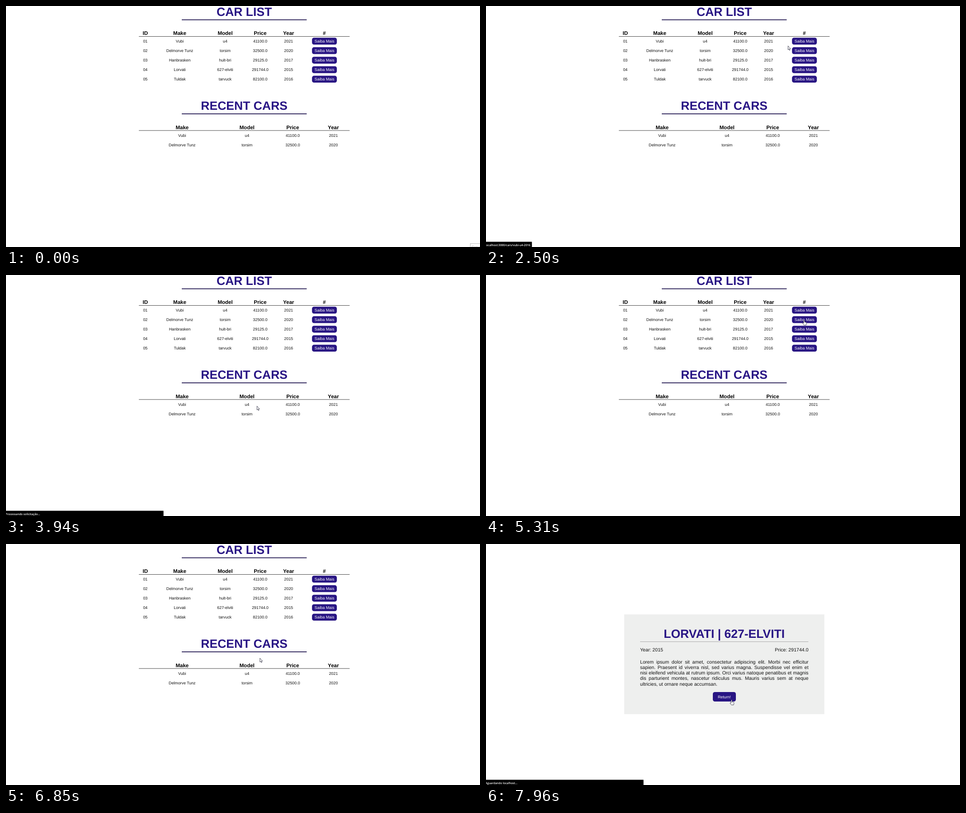
An HTML page for the animation above (8 s loop, 1049 by 534 pixels).

```html
<!DOCTYPE html>
<html lang="pt">
<head>
<meta charset="utf-8">
<style>
  html, body { margin: 0; width: 100%; height: 100%; overflow: hidden; background: #fff; }
  svg, #story, #status { position: absolute; }
  svg { left: 0; top: 0; }
  body { font-family: "Liberation Sans", Arial, sans-serif; color: #111; text-rendering: geometricPrecision; }
  text { font-size: 8.85px; fill: #111; }
  .mid { text-anchor: middle; }
  .end { text-anchor: end; }
  .title { font-size: 26.55px; font-weight: bold; fill: #291585; }
  .head { font-size: 11.5px; font-weight: bold; fill: #000; }
  .info { font-size: 10.62px; }
  .button { fill: #281583; }
  .label { fill: #fff; }
  #story { left: 341px; top: 255.5px; width: 372.6px; font-size: 10.62px; line-height: 12.25px; }
  #story div { text-align: justify; text-align-last: justify; }
  #story div:last-child { text-align-last: left; }
  #status { left: 0; top: 522px; height: 12px; box-sizing: border-box; padding-right: 3px; overflow: hidden;
    border: solid #666; border-width: 1px 1px 0 0; border-top-right-radius: 2px;
    background: #000; color: #fff; font: 600 6.27px/13px "Open Sans", sans-serif; white-space: nowrap; }
  #status span { margin-left: -1.5px; }
</style>
</head>
<body>
<svg width="1049" height="534" viewBox="0 0 1049 534">
  <g id="list"></g>
  <g id="detail"></g>
  <g id="corner">
    <rect x="1027.5" y="526.5" width="40" height="20" fill="#fff" stroke="#bbb"/>
    <text x="1030" y="536.5" style="font-size:8px;fill:#999">Gravar</text>
  </g>
</svg>
<div id="story"></div>
<div id="status"><span></span></div>
<svg width="1049" height="534" viewBox="0 0 1049 534">
  <g id="cursor" fill="#fff" stroke="#26263a" stroke-width=".8" stroke-linejoin="round">
    <path id="arrow" d="M.4 .4V9L2.3 7.3L3.7 10.3L5 9.7L3.7 6.8H6.2Z"/>
    <path id="hand" d="M-1 1Q0-.5 1 1V4.8L4.5 5.6Q5.5 6 5.3 7.5L4.5 11.6H-.5L-3.3 7.8Q-3.5 6.3-2.2 6.6L-1 7.6Z"/>
  </g>
</svg>
<script>
const LOOP = 8000, ROW = 21.07, CENTER = 527.2;
const $ = id => document.getElementById(id);

const cars = [
  ["01", "Vubi", "u4", "41100.0", "2021"],
  ["02", "Delmorve Tunz", "torsim", "32500.0", "2020"],
  ["03", "Hanbrasken", "hult-bri", "29125.0", "2017"],
  ["04", "Lorvati", "627-elviti", "291744.0", "2015"],
  ["05", "Tuldak", "tarvuck", "82100.0", "2016"]
];
const story = [
  "Lorem ipsum dolor sit amet, consectetur adipiscing elit. Morbi nec efficitur",
  "sapien. Praesent id viverra nisl, sed varius magna. Suspendisse vel enim et",
  "nisi eleifend vehicula at rutrum ipsum. Orci varius natoque penatibus et magnis",
  "dis parturient montes, nascetur ridiculus mus. Mauris varius sem at neque",
  "ultricies, ut ornare neque accumsan."
];

const text = (x, y, s, cls = "mid") => `<text x="${x}" y="${y}" class="${cls}">${s}</text>`;
const rect = (x, y, w, h, fill) => `<rect x="${x}" y="${y}" width="${w}" height="${h}" fill="${fill}"/>`;
const button = ({ x, y, w, h }, label) =>
  `<rect x="${x}" y="${y}" width="${w}" height="${h}" rx="4.5" class="button"/>` +
  text(x + w / 2, y + h / 2 + 3.1, label, "mid label");

const moreButtons = cars.map((_, i) => ({ x: 677.2, y: 70.3 + i * ROW, w: 55, h: 15.2 }));
const returnButton = { x: 502, y: 328, w: 51, h: 21 };

// A heading, its rule, the column heads and the rows, shifted down by dy.
function table(dy, title, columns, rows) {
  const line = (cells, y, cls) => cells.map((c, i) => text(columns[i][0], y, c, cls)).join("");
  return text(CENTER, 22 + dy, title, "mid title") +
    rect(389, 29.7 + dy, 276.5, 1.7, "#160a48") +
    line(columns.map(c => c[1]), 64.4 + dy, "mid head") +
    rect(294, 67 + dy, 466.5, 1, "#484848") +
    rows.map((r, i) => line(r, 81.1 + dy + i * ROW, "mid")).join("");
}

$("list").innerHTML =
  table(0, "CAR LIST",
    [[308.3, "ID"], [384.5, "Make"], [485, "Model"], [562.6, "Price"], [625.4, "Year"], [704.5, "#"]], cars) +
  moreButtons.map(b => button(b, "Saiba Mais")).join("") +
  table(208.4, "RECENT CARS",
    [[389.8, "Make"], [533.4, "Model"], [634.6, "Price"], [724.5, "Year"]],
    cars.slice(0, 2).map(c => c.slice(1)));

$("story").innerHTML = story.map(s => `<div>${s}</div>`).join("");

const detail = ([, make, model, price, year]) =>
  rect(305.8, 156, 443, 221, "#eeefee") +
  text(CENTER, 208.2, `${make} | ${model}`.toUpperCase(), "mid title") +
  rect(341, 216, 372.4, 1, "#aaa") +
  text(341, 237.8, "Year: " + year, "info") +
  text(713.6, 237.8, "Price: " + price, "info end") +
  button(returnButton, "Return!");

// Each visit: the link is hovered, its page opens, then Return is clicked.
const visits = [
  { car: 0, hover: 1650, open: 2620, back: 3660, slug: "vubi-u4-2016" },
  { car: 1, hover: 5520, open: 5700, back: 6440, slug: "delmorve-tunz-torsim-2020" },
  { car: 3, hover: 7340, open: 7440, back: 7950, slug: "lorvati-627-elviti-2015" }
];
const LOAD = 200;

function sceneAt(t) {
  const v = visits.findLast(v => t >= v.hover);
  if (!v) return {};
  if (t < v.open) return { status: "localhost:3000/cars/" + v.slug, fit: true };
  if (t < v.back) return { car: cars[v.car] };
  if (t < v.back + LOAD) return { car: cars[v.car], status: "Aguardando localhost..." };
  if (t < v.back + 2 * LOAD) return { status: "Processando solicitação..." };
  return {};
}

// The pointer eases from stop to stop, each given with its arrival time.
const onRow = i => [704, 78.4 + i * ROW], onReturn = [543.5, 345];
const stops = [
  [70, 752, 402], [260, 740, 397],
  [1210, ...onRow(2)], [1850, ...onRow(0)], [2500, 668, 88], [2920, 628, 118],
  [3400, ...onReturn], [3940, 555, 290], [4460, 531, 299],
  [5310, ...onRow(1)], [5710, 672, 135],
  [6250, ...onReturn], [6850, 561.5, 252.5],
  [7240, ...onRow(3)], [7960, ...onReturn]
];
const REST = 120, LONGEST = 800, STEP = 100;
const smooth = k => k * k * (3 - 2 * k);

function pointerAt(t) {
  const next = stops.findIndex(s => s[0] > t);
  if (next < 1) return stops.at(next).slice(1);
  const [left, x0, y0] = stops[next - 1], [arrive, x1, y1] = stops[next];
  const begin = Math.max(left + REST, arrive - LONGEST), span = arrive - begin;
  const count = Math.max(1, Math.round(span / STEP));
  const k = smooth(Math.max(0, Math.floor(count * (t - begin) / span)) / count);
  return [x0 + (x1 - x0) * k, y0 + (y1 - y0) * k];
}

const show = (id, on) => $(id).style.display = on ? "" : "none";
const inside = (x, y) => b => x >= b.x && x <= b.x + b.w && y >= b.y && y <= b.y + b.h + 1;
let shownCar;

function draw(t) {
  const { car, status = "", fit } = sceneAt(t);
  if (car && car !== shownCar) $("detail").innerHTML = detail(shownCar = car);
  show("list", !car);
  show("detail", car);
  show("story", car);

  show("status", status);
  $("status").firstChild.textContent = status;
  $("status").style.width = fit ? "auto" : "349px";

  const [x, y] = pointerAt(t);
  const over = (car ? [returnButton] : moreButtons).some(inside(x, y));
  show("corner", t < stops[0][0]);
  show("cursor", t >= stops[0][0]);
  show("hand", over);
  show("arrow", !over);
  $("cursor").setAttribute("transform", `translate(${x} ${y})`);
}

const start = performance.now();
function tick() {
  draw((performance.now() - start) % LOOP);
  requestAnimationFrame(tick);
}
tick();
</script>
</body>
</html>
```
